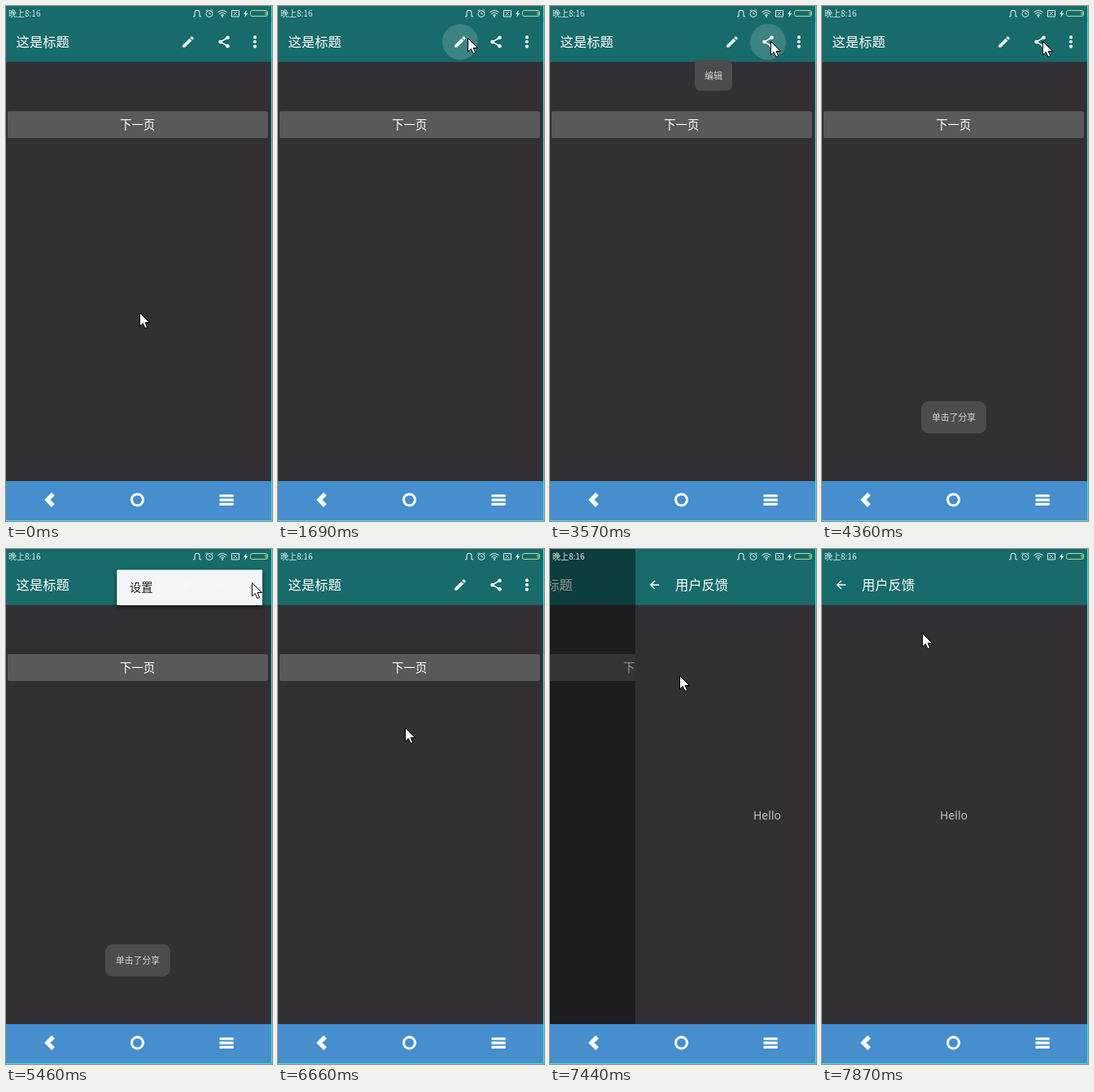
These frames come from a looping animation (327x632 px, 8 s). An HTML page with a canvas:

```html
<!DOCTYPE html>
<html lang="zh-CN">
<head>
<meta charset="utf-8">
<style>
html, body { margin: 0; width: 100%; height: 100%; overflow: hidden; background: #323033; }
canvas { display: block; width: 327px; height: 632px; }
</style>
</head>
<body>
<canvas id="stage"></canvas>
<script>
const W = 327, H = 632, NAV_TOP = 583, BAR = 68.5;
const LOOP = 8000, TICK = 134.8; // the screen refreshes once per tick
const TEAL = '#176b6b', DARK = '#323033', WHITE = '#fff';
const CJK = '"Noto Sans CJK SC", "Noto Sans CJK", sans-serif';
const canvas = document.getElementById('stage');
const dpr = window.devicePixelRatio || 1;
canvas.width = W * dpr;
canvas.height = H * dpr;
const c = canvas.getContext('2d');

const clamp = p => Math.min(1, Math.max(0, p));
const ramp = (n, from, len) => clamp((n - from) / len);
const within = (n, a, b) => n >= a && n < b;
const fade = (n, show, hide, rise = 3) => ramp(n, show - 1, rise) * (1 - ramp(n, hide - 1, 3));

// Damped swing that settles at 0
function settle(n, show) {
  const p = ramp(n, show, 3);
  return 11 * (1 - p) * Math.cos(2.1 * Math.PI * p);
}

// Left edge of the incoming page, eased in and out
const pageX = n => Math.round(W * (1 + Math.cos(Math.PI * ramp(n, 53, 3.24))) / 2);

const moves = [
  { from: 3, to: 6, x: 244, y: 31 },
  { from: 6, to: 8, x: 233, y: 39 },
  { from: 19, to: 22, x: 271, y: 43 },
  { from: 35, to: 36, x: 302, y: 41 },
  { from: 43, to: 48, x: 156, y: 219 },
  { from: 49, to: 52, x: 159, y: 155 },
  { from: 57, to: 58, x: 123, y: 103 }
];

function cursorAt(n) {
  let x = 164, y = 376;
  for (const m of moves) {
    const p = ramp(n, m.from, m.to - m.from);
    x += (m.x - x) * p;
    y += (m.y - y) * p;
  }
  return [Math.round(x), Math.round(y)];
}

function box(x, y, w, h, color, r = 0) {
  c.fillStyle = color;
  c.beginPath();
  c.roundRect(x, y, w, h, r);
  c.fill();
}

function disc(x, y, r, color) {
  c.fillStyle = color;
  c.beginPath();
  c.arc(x, y, r, 0, Math.PI * 2);
  c.fill();
}

function label(str, x, mid, size, color = WHITE, weight = 400) {
  c.font = `${weight} ${size}px ${CJK}`;
  c.fillStyle = color;
  c.fillText(str, x, mid + size * .38);
}

function line(path, width, color = WHITE) {
  c.strokeStyle = color;
  c.lineWidth = width;
  c.stroke(new Path2D(path));
}

function shifted(x, y, paint) {
  c.save();
  c.translate(x, y);
  paint();
  c.restore();
}

// Draws in a 24-unit box centred on x, y
function icon(x, y, scale, paint) {
  shifted(x, y, () => {
    c.scale(scale, scale);
    c.translate(-12, -12);
    paint();
  });
}

const pencil = new Path2D('M3 17.25V21h3.75L17.81 9.94l-3.75-3.75zM20.71 7.04a1 1 0 0 0 0-1.41l-2.34-2.34a1 1 0 0 0-1.41 0l-1.83 1.83 3.75 3.75z');
const arrow = new Path2D('M0 0V16.5L3.8 13 6.5 19 9.2 17.8 6.6 12H12Z');

function drawPencil() {
  c.fillStyle = WHITE;
  c.fill(pencil);
}

function drawShare() {
  line('M18 5L6 12L18 19', 2);
  disc(18, 5, 3, WHITE);
  disc(6, 12, 3, WHITE);
  disc(18, 19, 3, WHITE);
}

function drawDots() {
  for (let y = 6; y <= 18; y += 6) disc(12, y, 2.2, WHITE);
}

function drawBack() {
  line('M20 12H5.5M12.5 4.8L5.3 12L12.5 19.2', 2);
}

function pageBase(title, x) {
  box(0, BAR, W, NAV_TOP - BAR, DARK);
  box(0, 0, W, BAR, TEAL);
  label(title, x, 44, 16.3, WHITE, 500);
}

function mainPage(n) {
  const ripple = x => disc(x, 44, 22, 'rgba(255,255,255,.16)');
  pageBase('这是标题', 12.6);
  if (within(n, 12, 19)) ripple(224);
  if (n === 26) ripple(268);
  icon(224, 44, .75, drawPencil);
  icon(268, 44, .75, drawShare);
  icon(306, 44, .93, drawDots);
  box(2, 129, 320, 33, n === 53 ? '#706f72' : '#59585b', 2);
  label('下一页', 140, 145.5, 14.4);
}

function nextPage() {
  pageBase('用户反馈', 49);
  icon(23.5, 44, .7, drawBack);
  c.font = '14px "Noto Sans", sans-serif';
  c.fillStyle = '#c0bfc1';
  c.fillText('Hello', 145, 332);
}

function pages(n) {
  const x = pageX(n);
  const shown = 1 - x / W;
  shifted(-Math.round(73 * shown), 0, () => mainPage(n));
  if (!shown) return;
  box(0, 0, x, NAV_TOP, 'rgba(0,0,0,.42)');
  shifted(x, 0, nextPage);
}

function statusBar() {
  const ink = '#e2eeee';
  label('晚上8:16', 3, 9, 10, ink, 500);
  line('M230 13l2-.5V9a3 3.8 0 0 1 6 0v3.5l2 .5', 1.1, ink);
  line('M246 9.5a4 4 0 1 0 8 0a4 4 0 1 0-8 0M250 7.5v2.3h1.8M245.5 6l2-1.7M254.5 6l-2-1.7', 1, ink);
  line('M260.5 7.8q5.5-4.6 11 0M262.4 9.8q3.6-3 7.2 0M264.3 11.6q1.7-1.4 3.4 0', 1.1, ink);
  disc(266, 13, .9, ink);
  line('M277.5 5.5h9v7.5h-9zM280 7.3l4 4M284 7.3l-4 4', 1, ink);
  c.fillStyle = ink;
  c.fill(new Path2D('M295.8 5L292 10h2.2L293.4 14 297.3 8.7H295z'));
  c.beginPath();
  c.roundRect(300.5, 5.5, 21, 7, 2);
  c.strokeStyle = '#b4d8b0';
  c.lineWidth = 1;
  c.stroke();
  box(318.5, 6.5, 2.5, 5, '#58c04c');
}

function navBar() {
  box(0, NAV_TOP, W, H - NAV_TOP, '#468ecd');
  line('M58 598.8L50.8 606L58 613.2', 5.2);
  line('M154.5 606a7 7 0 1 0 14 0a7 7 0 1 0-14 0', 3);
  for (let i = 0; i < 3; i++) box(262.5, 599.4 + 5.2 * i, 17.2, 3.2, WHITE, .5);
}

function bubble(n, show, hide, str, x, y, w, h, r, size) {
  const alpha = fade(n, show, hide);
  if (!alpha) return;
  c.globalAlpha = alpha;
  shifted(x, y + settle(n, show), () => {
    box(0, 0, w, h, '#4c4b4e', r);
    label(str, (w - str.length * size) / 2, h / 2 + .4, size, '#d8d8d9');
  });
  c.globalAlpha = 1;
}

function menu(n) {
  const alpha = fade(n, 40, 47, 1.04);
  if (!alpha) return;
  c.save();
  c.globalAlpha = alpha;
  c.shadowColor = 'rgba(0,0,0,.75)';
  c.shadowBlur = 5 * dpr;
  c.shadowOffsetY = 1.5 * dpr;
  box(136.3, 25.4, 178.9, 43.6, '#fefeff', 1);
  c.shadowColor = 'transparent';
  label('设置', 152, 46.6, 14.2, '#0c0c0d', 500);
  c.restore();
}

function pointer(n) {
  const [x, y] = cursorAt(n);
  shifted(x + .5, y + .5, () => {
    c.fillStyle = WHITE;
    c.fill(arrow);
    c.strokeStyle = '#000';
    c.lineWidth = 1;
    c.stroke(arrow);
  });
}

function draw(t) {
  const n = Math.floor((t - 10) / TICK);
  c.setTransform(dpr, 0, 0, dpr, 0, 0);
  pages(n);
  statusBar();
  bubble(n, 15, 28, '编辑', 178, 66, 46, 38, 7, 11);
  bubble(n, 29, 44, '单击了分享', 122, 485, 80, 39.5, 9, 10.8);
  menu(n);
  navBar();
  box(W - 1, 0, 1, H, '#40dfe3');
  box(0, H - 1, W, 1, '#40dfe3');
  pointer(n);
}

const start = performance.now();
function tick() {
  draw((performance.now() - start) % LOOP);
  requestAnimationFrame(tick);
}
tick();
</script>
</body>
</html>
```
